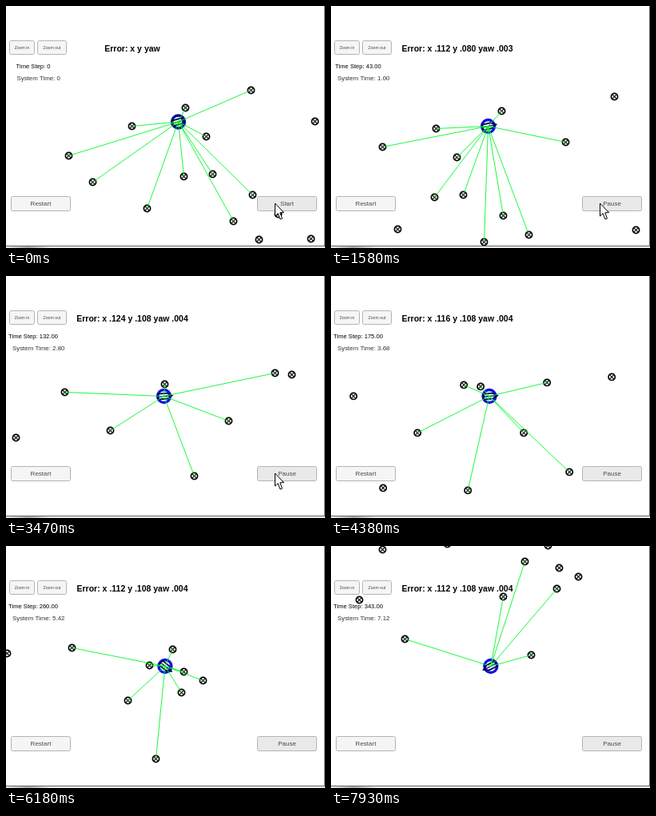
Animation of 399 by 303 pixels, one loop 8000 ms. Source, as an HTML page with a canvas:

```html
<!DOCTYPE html>
<html>
<head>
<meta charset="utf-8">
<style>
html, body { margin: 0; width: 100%; height: 100%; overflow: hidden; background: #fff; }
canvas { display: block; }
</style>
</head>
<body>
<canvas id="stage" width="399" height="303"></canvas>
<script>
const ctx = document.getElementById('stage').getContext('2d');
const LOOP = 8000, START = 500, TICK = 64.6, LAST_TICK = 115, SENSOR_RANGE = 149;

// The map: landmark positions in world pixels
const landmarks = [
  [224,127],[306,105],[386,144],[157,150],[250,163],[78,187],[108,220],[222,213],[258,210],
  [308,236],[176,253],[284,269],[316,292],[381,291],[340,260],[474,254],[447,87],[572,77],
  [504,135],[710,63],[731,65],[652,123],[609,192],[895,53],[1021,55],[814,60],[992,75],
  [1035,83],[1059,94],[1032,109],[965,119],[785,123],[842,172],[1000,192],[715,195]];

// Camera waypoints: tick, x, y
const route = [
  [3,-18,5],[17,-93,26],[28,-184,41],[46,-374,58],[73,-696,83],[88,-813,74],[103,-822,-18],[115,-750,-56]];

// Camera position on a cubic Hermite curve through the waypoints
function camera(tick) {
  let i = 0;
  while (i < route.length - 2 && tick >= route[i + 1][0]) i++;
  const a = route[i], b = route[i + 1], span = b[0] - a[0];
  const u = Math.max(0, (tick - a[0]) / span);
  const slope = (j, axis) => {
    const prev = route[Math.max(0, j - 1)], next = route[Math.min(route.length - 1, j + 1)];
    return (next[axis] - prev[axis]) / (next[0] - prev[0]);
  };
  return [1, 2].map(axis =>
    a[axis] * (1 + 2 * u) * (1 - u) ** 2 + b[axis] * u * u * (3 - 2 * u) +
    span * u * (1 - u) * (slope(i, axis) * (1 - u) - slope(i + 1, axis) * u));
}

function heading(tick) {
  const mid = Math.min(LAST_TICK - .3, Math.max(3.3, tick));
  const [x0, y0] = camera(mid - .3), [x1, y1] = camera(mid + .3);
  return Math.atan2(y0 - y1, x0 - x1);
}

// Simulation clock runs in 20 ms cycles; the step count slowly falls behind it
function readouts(tick) {
  const cycles = Math.max(0, Math.floor(3.1224 * tick - 2.88));
  const step = Math.max(0, cycles - Math.round(5.5 + .021 * cycles));
  const errorX = 112 + 12 * Math.exp(-(((tick - 46) / 14) ** 2));
  const errorY = Math.min(108, 63 + tick);
  const format = v => ' .' + String(Math.round(v)).padStart(3, '0');
  return {
    step: step ? step.toFixed(2) : '0',
    seconds: cycles ? (cycles * .02).toFixed(2) : '0',
    errors: step ? [errorX, errorY, errorY / 29].map(format) : ['', '', ''],
  };
}

function label(text, x, y, size, color = '#000', weight = '') {
  ctx.font = `${weight} ${size}px "Liberation Sans", Arial, sans-serif`;
  ctx.textAlign = 'center';
  ctx.fillStyle = color;
  ctx.fillText(text, x, y);
}

function button(text, x, y, w, h, size, fill = '#f5f5f5') {
  ctx.fillStyle = fill;
  ctx.strokeStyle = '#b4b4b4';
  ctx.lineWidth = 1;
  ctx.beginPath();
  ctx.roundRect(x + .5, y + .5, w - 1, h - 1, 2);
  ctx.fill();
  ctx.stroke();
  label(text, x + w / 2, y + h / 2 + size * .36, size, '#4a4a4a');
}

function strokePath(points, color, width) {
  ctx.strokeStyle = color;
  ctx.lineWidth = width;
  ctx.beginPath();
  points.forEach(([x, y]) => ctx.lineTo(x, y));
  ctx.stroke();
}

function ring(x, y, r, color, width) {
  ctx.strokeStyle = color;
  ctx.lineWidth = width;
  ctx.beginPath();
  ctx.arc(x, y, r, 0, 7);
  ctx.stroke();
}

function landmark(x, y) {
  ring(x, y, 4.1, '#000', 1.7);
  for (const d of [-2.7, 2.7]) strokePath([[x - 2.7, y - d], [x + 2.7, y + d]], '#000', 1.1);
}

function car(x, y, angle, parked) {
  ctx.save();
  ctx.translate(x, y);
  ring(0, 0, 8, parked ? '#0a0a90' : '#1010e8', 3.4);
  ctx.rotate(angle);
  const nose = parked ? 7 : 10;
  strokePath([[-7, -3.5], [4, -3.5], [nose, 0], [4, 3.5], [-7, 3.5], [-7, -3.5]], '#08083c', 1.9);
  strokePath([[-6, 0], [nose - 1, 0]], '#1010c0', 1.4);
  ctx.restore();
}

function cursor(x, y) {
  const outline = [[0, 0], [0, 16], [3.6, 12.7], [6.5, 20], [9, 19], [6.3, 11.8], [11, 11.6]];
  ctx.beginPath();
  outline.forEach(([dx, dy]) => ctx.lineTo(x + dx, y + dy));
  ctx.closePath();
  ctx.fillStyle = '#fff';
  ctx.fill();
  ctx.strokeStyle = '#000';
  ctx.lineWidth = 1;
  ctx.stroke();
}

function windowEdge() {
  const strip = ctx.createLinearGradient(0, 0, 56, 0);
  strip.addColorStop(0, '#eaeaea');
  strip.addColorStop(.5, '#a8a8b0');
  strip.addColorStop(1, '#eaeaea');
  ctx.fillStyle = strip;
  ctx.fillRect(0, 301, 399, 2);
  ctx.fillStyle = '#666';
  ctx.fillRect(0, 300, 399, 1);
  ctx.fillRect(398, 0, 1, 301);
}

function drawWorld(tick, moving) {
  const [camX, camY] = moving ? camera(tick) : [0, 0];
  const [carX, carY] = moving ? [195.5 + tick / 30, 150] : [215, 144.5];
  const placed = landmarks.map(([x, y]) => [x + camX, y + camY]);

  ctx.save();
  ctx.beginPath();
  ctx.rect(0, 0, 398, 300);
  ctx.clip();
  ctx.translate(.5, .5);
  placed.forEach(([x, y]) => landmark(x, y));
  car(carX, carY, heading(tick), !moving);
  for (const [x, y] of placed)
    if (Math.hypot(x - carX, y - carY) < SENSOR_RANGE)
      strokePath([[carX, carY], [x, y]], '#00f828', .9);
  ctx.restore();
}

function draw(time) {
  const tick = time < START ? -1 : Math.min(LAST_TICK, Math.floor((time - START + 20) / TICK));

  ctx.fillStyle = '#fff';
  ctx.fillRect(0, 0, 399, 303);
  drawWorld(tick, tick >= 1);

  button('Zoom in', 4, 43, 32, 18, 5.2);
  button('Zoom out', 39, 43, 37, 18, 5.2);
  button('Restart', 6, 238, 75, 19, 8);
  button(tick < 0 ? 'Start' : 'Pause', 314, 238, 75, 19, 8, '#e9e9e9');

  const { step, seconds, errors: [x, y, yaw] } = readouts(tick);
  label(`Error: x${x} y${y} yaw${yaw}`, 158, 57, 10.5, '#000', 'bold');
  label('Time Step: ' + step, 34, 78, 7.6);
  label('System Time: ' + seconds, 40.7, 93, 7.9, '#333');

  windowEdge();
  // The pointer slides off the bottom edge
  cursor(336.5, 247 + Math.max(0, tick - 47) * 14);
}

function frame() {
  draw(performance.now() % LOOP);
  requestAnimationFrame(frame);
}
frame();
</script>
</body>
</html>
```
